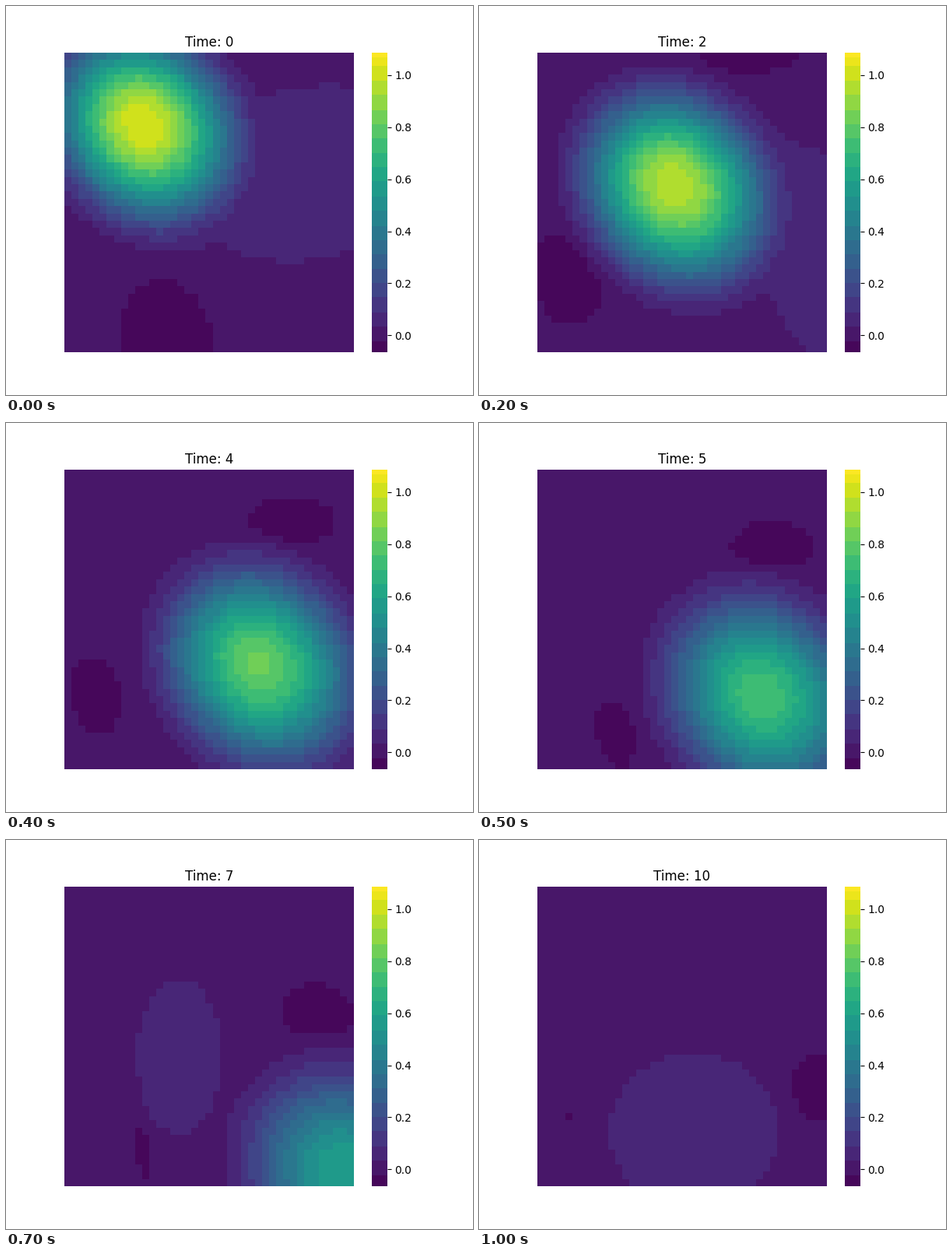
Recreate the animation shown at these times as a matplotlib script. Size 600 by 500 pixels, loop 1.1 s.

```python
import numpy as np
import matplotlib.pyplot as plt
from matplotlib.animation import FuncAnimation
from matplotlib.colors import ListedColormap

N, STEPS = 41, 11
LEFT, TOP, WIDTH, HEIGHT = 75, 60, 372, 385
VMIN, VMAX = -0.0645, 1.086
BASE, EDGE = 0.006, 0.0285   # background value, offset to the next colour band

cell = np.arange(N) + 0.5
X, Y = np.meshgrid(LEFT + cell * WIDTH / N, TOP + cell * HEIGHT / N)


def hill(t):
    """Raised cosine drifting down the diagonal, decaying and leaving the stage."""
    peak = 1.03 / (1 + (t / 8) ** 2) * np.clip((10.5 - t) / 2.5, 0, 1)
    dx = X - (175.5 + 37.2 * t)
    dy = (Y - (152 + 39.3 * t)) / 1.035
    r = np.hypot(dx, dy) + 1e-9
    stretch = 1 + 0.16 * dx * dy / r**2 + 0.03 * (dx + dy) / r
    radius = (168 + 2.5 * t) * stretch
    return peak * (1 + np.cos(np.pi * np.minimum(r / radius, 1))) / 2


def patch(cx, cy, rx, ry, tilt=0):
    """Flat lump that crosses EDGE on its ellipse."""
    c, s = np.cos(np.radians(tilt)), np.sin(np.radians(tilt))
    dx, dy = X - cx, Y - cy
    rx, ry = max(rx, 1), max(ry, 1)
    q = ((dx * c + dy * s) / rx) ** 2 + ((dy * c - dx * s) / ry) ** 2
    return 2 * EDGE * 0.5 ** np.minimum(q**2, 50)


def ripple(t):
    """Faint swells around the hill: two bright, two dark."""
    turn = np.pi * t / 3
    front = patch(390 + 20 * t, 215 + 50 * t, 160 - 45 * t, 110 + 15 * t, -13)
    wake = patch(240 + 18 * (t - 8), 310 + 32 * (t - 8), 54 * max(t - 6, 0) ** 0.5, 100)
    sinking = patch(345 + 11 * (t - 2), 62 + 32 * (t - 2), 75 - 4 * t, 20 + 2.5 * t)
    swinging = patch(145 + 60 * np.cos(turn), 375 + 50 * np.cos(turn),
                     60 - 7 * t, 75 - 6 * t, -10)
    return front + wake - sinking - swinging


def field(t):
    h = hill(t)
    return BASE + h + ripple(t) * np.exp(-h / 0.04)


def banded_viridis():
    edges = np.concatenate([[0], 9 + 12.37 * np.arange(20), [252, 256]])
    band = np.searchsorted(edges, np.arange(256), side="right") - 1
    mid = (edges[band] + edges[band + 1]) / 2
    return ListedColormap(plt.get_cmap("viridis")(mid.astype(int)))


fig, ax = plt.subplots(figsize=(6, 5), dpi=100)
mesh = ax.pcolormesh(field(0), cmap=banded_viridis(), vmin=VMIN, vmax=VMAX)
ax.invert_yaxis()
ax.axis("off")
bar = fig.colorbar(mesh, ax=ax)
bar.outline.set_linewidth(0)
title = ax.set_title("Time: 0")


def update(t):
    mesh.set_array(field(t))
    title.set_text(f"Time: {t}")
    return mesh, title


anim = FuncAnimation(fig, update, frames=STEPS, interval=100, repeat=True, repeat_delay=0)
plt.show()
```
